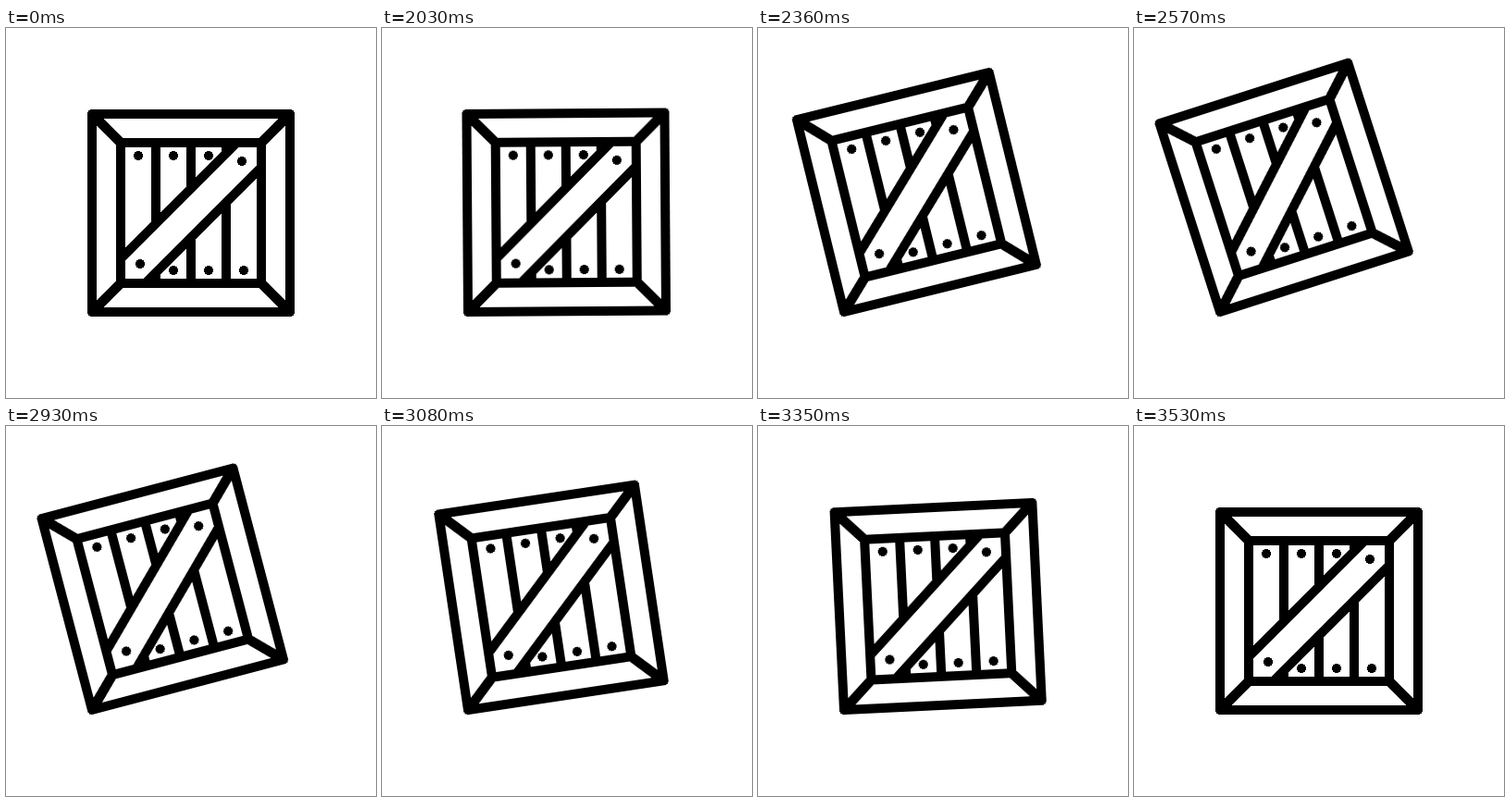
An HTML page for the animation above (3590 ms loop, 400 px wide and 400 px high).

```html
<!DOCTYPE html>
<html lang="en">
<head>
<meta charset="utf-8">
<title>Crate</title>
<style>
  html, body { margin: 0; width: 100%; height: 100%; overflow: hidden; background: #fff; }
  svg { display: block; width: 100%; height: 100%; }
  #crate {
    fill: #fff; stroke: #000; stroke-width: 10;
    stroke-linejoin: round; stroke-linecap: round;
    shape-rendering: crispEdges;
    transform-origin: 93px 307px;
  }
  #nails { fill: #000; stroke: none; }
</style>
</head>
<body>
<svg viewBox="0 0 400 400">
  <g id="crate">
    <path d="M93 93H307V307H93Z"/>
    <path d="M93 93L307 307M307 93L93 307"/>
    <path d="M124 124H276V276H124Z"/>
    <path d="M162 124V276M200 124V276M238 124V276"/>
    <path d="M124 249.2L249.2 124H276V150.8L150.8 276H124Z"/>
    <g id="nails">
      <circle cx="143" cy="138" r="5.1"/>
      <circle cx="181" cy="138" r="5.1"/>
      <circle cx="219" cy="138" r="5.1"/>
      <circle cx="255" cy="144" r="5.1"/>
      <circle cx="145" cy="255" r="5.1"/>
      <circle cx="181" cy="262" r="5.1"/>
      <circle cx="219" cy="262" r="5.1"/>
      <circle cx="257" cy="262" r="5.1"/>
    </g>
  </g>
</svg>
<script>
  const LOOP = 3590, STEP = 30, START = 2030;

  // time in ms, tilt in degrees, easing towards the next key
  const keys = [
    [0, 0, 'linear'],
    [2000, 0, 'cubic-bezier(.2, .03, .48, 1)'],
    [2630, -18, 'cubic-bezier(.333, 0, .667, .09)'],
    [3200, 0, 'cubic-bezier(.333, .667, .667, 1)'],
    [3365, -2.8, 'cubic-bezier(.333, 0, .667, .333)'],
    [3530, 0, 'linear'],
    [LOOP, 0, 'linear']
  ];

  const tilt = document.getElementById('crate').animate(
    keys.map(([ms, deg, easing]) => ({
      offset: ms / LOOP, transform: `rotate(${deg}deg)`, easing
    })),
    { duration: LOOP, fill: 'both' }
  );
  tilt.pause();

  const origin = performance.now();

  function draw() {
    const t = (performance.now() - origin) % LOOP;
    // the crate moves in discrete steps after its long rest
    tilt.currentTime = t < START ? 0 : START + Math.floor((t - START) / STEP) * STEP;
    requestAnimationFrame(draw);
  }
  draw();
</script>
</body>
</html>
```
